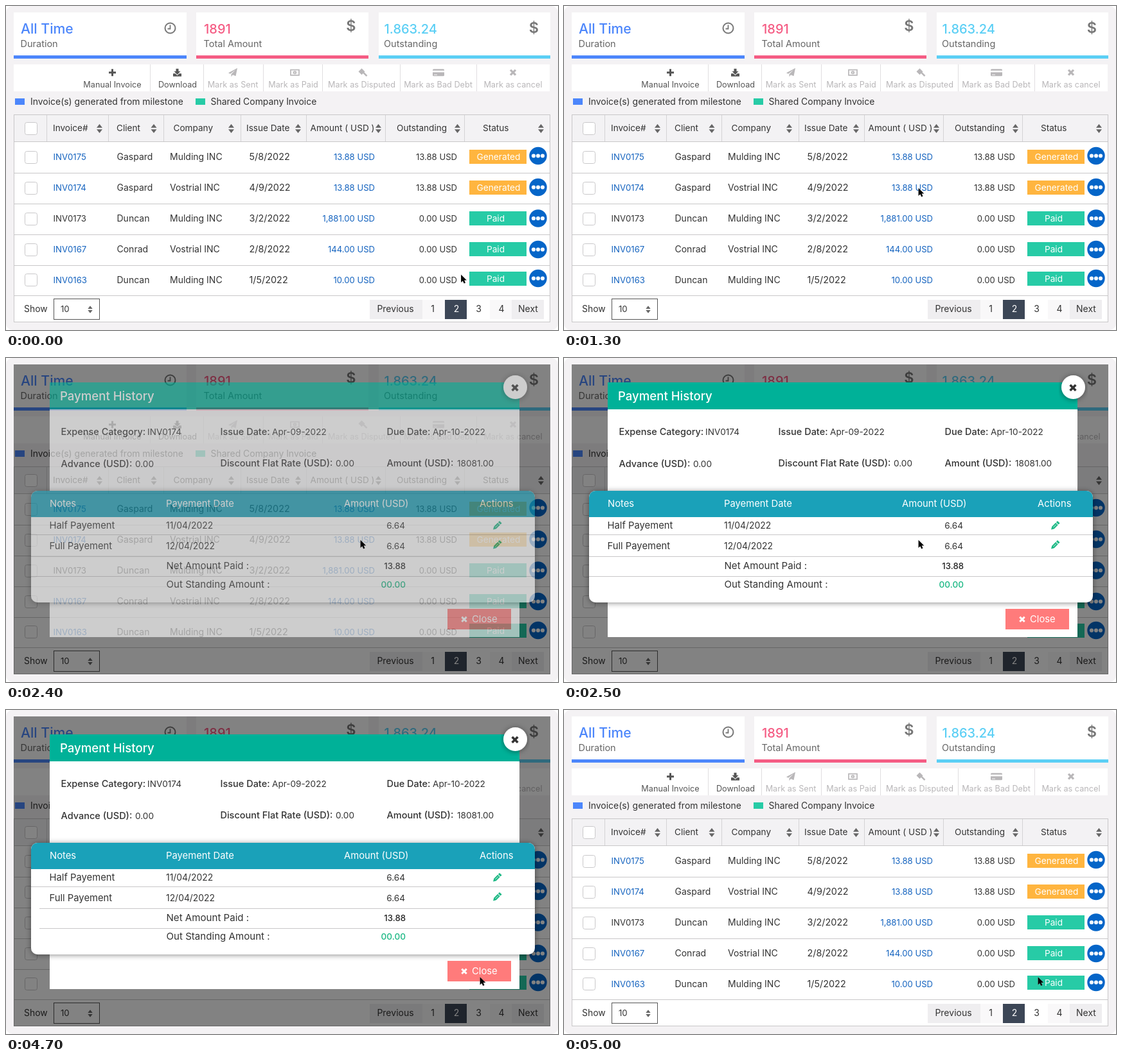
These frames come from a looping animation (859 px wide and 505 px high, 5.6 s). An HTML page:

```html
<!DOCTYPE html>
<html lang="en">
<head>
<meta charset="utf-8">
<title>Invoices</title>
<style>
html, body { margin: 0; width: 100%; height: 100%; overflow: hidden; background: #fff; }
svg { display: block; width: 859px; height: 505px; font-family: Inter, "Open Sans", sans-serif; }
</style>
</head>
<body>
<svg id="stage" viewBox="0 0 859 505" xmlns="http://www.w3.org/2000/svg">
  <defs>
    <filter id="shadow" x="-10%" y="-20%" width="120%" height="140%">
      <feDropShadow dx="0" dy="1" stdDeviation="4" flood-opacity=".45"/>
    </filter>
  </defs>
  <rect width="859" height="505" rx="10" fill="#f4f2f4"/>
  <g id="page"></g>
  <rect id="dim" x="12" y="10" width="835" height="483" fill="#000" fill-opacity=".49"/>
  <g id="modal"></g>
  <path id="cursor" d="M0 0V12.4L2.8 9.9 4.7 14 7.1 13 5.3 8.9H9Z" fill="#000" stroke="#fff" stroke-opacity=".35" stroke-width=".5"/>
</svg>
<script>
const $ = id => document.getElementById(id);
const INK = '#333', LINK = '#1463bf', MUTED = '#b9b7b9', ICON = '#555',
      TEAL = '#27cba6', AMBER = '#ffb53f', LINE = '#c8c7c8';

const rect = (x, y, w, h, fill, more = '') =>
  `<rect x="${x}" y="${y}" width="${w}" height="${h}" fill="${fill}" ${more}/>`;
const path = (d, fill, more = '') => `<path d="${d}" fill="${fill}" ${more}/>`;
const line = (d, color, width = 1, more = '') =>
  path(d, 'none', `stroke="${color}" stroke-width="${width}" ${more}`);
const circle = (x, y, r, fill, more = '') =>
  `<circle cx="${x}" cy="${y}" r="${r}" fill="${fill}" ${more}/>`;
const text = (x, y, s, size, fill = INK, anchor = 'start', weight = 400) =>
  `<text x="${x}" y="${y}" font-size="${size}" fill="${fill}" text-anchor="${anchor}" font-weight="${weight}">${s}</text>`;
const at = (x, y, body) => `<g transform="translate(${x} ${y})">${body}</g>`;

const cross = (x, y, r, color, width) =>
  at(x, y, line(`M${-r} ${-r}L${r} ${r}M${r} ${-r}L${-r} ${r}`, color, width));
const sorter = (x, y, k = 1) =>
  at(x, y, path(`M0 ${-7 * k}L${4.5 * k} ${-1.2 * k}H${-4.5 * k}ZM0 ${7 * k}L${4.5 * k} ${1.2 * k}H${-4.5 * k}Z`, '#666'));
const checkbox = y => rect(29.5, y - 9.5, 19, 19, '#fff', 'rx="3" stroke="#c9c8ca"');

function card(x, w, pad, title, label, color, size) {
  return rect(x, 10, w, 67, '#fff') + rect(x, 77, w, 5, color) +
    text(x + pad, 43, title, size, color, 'start', 500) +
    text(x + pad - .5, 64, label, 14.5, '#666');
}

function cards() {
  return card(12, 269, 11, 'All Time', 'Duration', '#4c86fb', 21.2) +
    card(296, 268, 12, '1891', 'Total Amount', '#f55c84', 20) +
    card(580, 267, 8.5, '1.863.24', 'Outstanding', '#5bcff5', 20) +
    circle(255.5, 34.5, 8, 'none', 'stroke="#777" stroke-width="2"') +
    line('M255.5 29.5V35.5H251.5', '#777', 1.8) +
    text(537, 39, '$', 23.5, '#777', 'middle', 600) +
    text(821.5, 42, '$', 23.5, '#777', 'middle', 600);
}

const icons = {
  plus: line('M0-5.5V5.5M-5.5 0H5.5', ICON, 3),
  load: path('M-2-6H2V-2H5L0 3.2-5-2H-2Z', ICON) + path('M-6.5 1.5H-3L0 4.5 3 1.5H6.5V6H-6.5Z', ICON),
  plane: path('M7-7L4.5 5.5 0 3.6-2.5 6.5V2.5L4.5-4.5-4 2-7 .5Z', MUTED),
  note: rect(-6.5, -4.2, 13, 8.4, 'none', `stroke="${MUTED}" stroke-width="1.7"`) +
    circle(0, 0, 2.6, MUTED) + line('M0-1.6V1.6', '#fff', .8),
  gavel: path('M-6.5-1.5L-1.5-6.5 3.5-1.5-1.5 3.5Z', MUTED) + line('M1 0L6.5 5.5', MUTED, 2.6),
  bank: rect(-9, -5.5, 18, 11, MUTED, 'rx="1.5"') + rect(-9, -3, 18, 2.6, '#fff') + line('M-7 3.5H-2', '#fff', .9),
  stop: line('M-4-4L4 4M4-4L-4 4', MUTED, 3.2)
};

function toolbar() {
  const items = [
    [165.5, 165.5, 'Manual Invoice', 'plus'], [267, 266.5, 'Download', 'load'],
    [353, 353, 'Mark as Sent', 'plane'], [447, 449.5, 'Mark as Paid', 'note'],
    [553.5, 555, 'Mark as Disputed', 'gavel'], [672.5, 673, 'Mark as Bad Debt', 'bank'],
    [789, 789, 'Mark as cancel', 'stop']
  ];
  return rect(12, 91, 834, 42, '#fff') +
    [224, 307, 400, 492, 613, 732].map(x => rect(x, 91, 1, 42, '#e0dee0')).join('') +
    items.map(([x, iconX, s, icon], i) =>
      at(iconX, 103.7, icons[icon]) +
      text(x, 127, s, 12.7, i < 2 ? '#555' : MUTED, 'middle')).join('');
}

function legend() {
  return rect(14, 144, 15, 10, '#4c86fb') + text(38, 154, 'Invoice(s) generated from milestone', 13.95) +
    rect(295, 144, 15, 10, TEAL) + text(318.5, 154, 'Shared Company Invoice', 13.95);
}

function row([no, client, firm, date, amount, due, paid], i) {
  const mid = 235 + 48 * i, base = mid + 5, last = i == 4;
  const top = last ? 414 : 224 + 48 * i;
  const dotY = [233.5, 282.5, 331, 379.5, 424.5][i];
  return checkbox(last ? 427 : mid + 1) +
    text(73.5, base, no, 13.2, i == 2 ? INK : LINK) +
    text(172.5, base, client, 14) + text(255, base, firm, 14) + text(378.5, base, date, 14.4) +
    text(574, base, amount + ' USD', 13.1, LINK, 'end') +
    text(702, base, due + ' USD', 13.1, INK, 'end') +
    rect(721, top, 89, 22, paid ? TEAL : AMBER) +
    text(paid ? 762 : 766.5, top + 15.5, paid ? 'Paid' : 'Generated', 13.7, '#fff', 'middle') +
    circle(828, dotY, 13.7, '#0465c8') +
    [-7, 0, 7].map(d => circle(828 + d, dotY, 3.1, '#fff')).join('');
}

function table() {
  const heads = [[73, 'Invoice#'], [172, 'Client'], [260.5, 'Company'], [374, 'Issue Date'],
    [473.5, 'Amount ( USD )'], [608, 'Outstanding'], [742, 'Status']];
  const rows = [
    ['INV0175', 'Gaspard', 'Mulding INC', '5/8/2022', '13.88', '13.88', 0],
    ['INV0174', 'Gaspard', 'Vostrial INC', '4/9/2022', '13.88', '13.88', 0],
    ['INV0173', 'Duncan', 'Mulding INC', '3/2/2022', '1,881.00', '0.00', 1],
    ['INV0167', 'Conrad', 'Vostrial INC', '2/8/2022', '144.00', '0.00', 1],
    ['INV0163', 'Duncan', 'Mulding INC', '1/5/2022', '10.00', '0.00', 1]
  ];
  return rect(12.5, 169.5, 834, 323, '#fff') + rect(13, 170, 833, 41, '#f3f2f4') +
    [63, 159, 245, 365, 467, 590, 713].map(x => rect(x, 170, 1, 41, '#d4d3d5')).join('') +
    [211, 260, 308, 356, 404, 451].map(y => rect(13, y, 833, 1, LINE)).join('') +
    rect(12.5, 169.5, 834, 323, 'none', `stroke="${LINE}"`) +
    checkbox(191) +
    heads.map(([x, s]) => text(x, 194.7, s, 13.6)).join('') +
    [145.5, 230, 350.5, 454.5, 579.5, 702.5, 832.5].map(x => sorter(x, 191)).join('') +
    rows.map(row).join('');
}

function footer() {
  const pages = [
    [566, 82, 606, 'Previous', '#efeef0'], [648, 35, 664, '1', '#f9f8f9'], [683, 34, 701, '2', '#3c4656'],
    [717, 36, 735.5, '3', '#fff'], [753, 34, 771, '4', '#f9f8f9'], [787, 50, 812.5, 'Next', '#efeef0']
  ];
  return text(28, 477, 'Show', 13.9) +
    rect(74.5, 456.5, 71, 32, '#fff', 'stroke="#555"') + text(85, 477, '10', 13.2) + sorter(131, 473, .82) +
    pages.map(([x, w, mid, s, fill]) => rect(x, 458, w, 30, fill) +
      text(mid, 477, s, 14, s == '2' ? '#fff' : INK, 'middle')).join('');
}

const pencil = y => at(764, y, `<g transform="rotate(45)">` +
  path('M-2.5-4.2H2.5V4.2L0 8.4-2.5 4.2ZM-2.5-8.2H2.5V-5.2H-2.5Z', '#1bb884') +
  line('M0-3V3.6', '#fff', .8) + '</g>');

function modal() {
  const fields = [
    [85.5, 220, 120, 'Expense Category:', 'INV0174'], [333.5, 414, 120, 'Issue Date:', 'Apr-09-2022'],
    [592.5, 664, 120, 'Due Date:', 'Apr-10-2022'], [85.5, 201, 170, 'Advance (USD):', '0.00'],
    [333.5, 513, 169, 'Discount Flat Rate (USD):', '0.00'], [592.5, 702, 169, 'Amount (USD):', '18081.00']
  ];
  const panel = rect(39, 207, 784, 174, '#fff', 'rx="10" filter="url(#shadow)"') +
    path('M39 248V217A10 10 0 0 1 49 207H813A10 10 0 0 1 823 217V248Z', '#1aa1b9') +
    [[68, 'Notes'], [249, 'Payement Date'], [526, 'Amount (USD)'], [737, 'Actions']]
      .map(([x, s]) => text(x, 232, s, 14.8, '#fff')).join('') +
    rect(39, 275, 784, 1, LINE) +
    '<path id="rules" stroke="#c8c7c8"/>' +
    [['Half Payement', '11/04/2022', 266], ['Full Payement', '12/04/2022', 297.5]].map(([s, date, y]) =>
      text(67.5, y, s, 14.8) + text(249, y, date, 13.9) + text(621, y, '6.64', 13.6, INK, 'end')).join('') +
    pencil(261.5) + pencil(291.5) +
    text(249.5, 329, 'Net Amount Paid :', 15.1) + text(622, 329, '13.88', 13.2, '#222', 'end', 500) +
    text(249.5, 358, 'Out Standing Amount :', 15.1) + text(622, 358, '00.00', 13.6, '#1bb884', 'end', 500);
  return rect(68, 38, 731, 397, '#fff') + rect(68, 38, 731, 42, '#00b198') +
    text(84, 65.5, 'Payment History', 18.6, '#fff', 'start', 500) +
    fields.map(([x, vx, y, label, value]) =>
      text(x, y, label, 14.5, INK, 'start', 500) + text(vx, y, value, 13.6)).join('') +
    rect(687, 391, 99, 32, '#ff7b7b') + cross(713, 407.3, 3.7, '#fff', 3) + text(725, 412, 'Close', 14.8, '#fff') +
    panel +
    circle(792.5, 45.5, 18.5, '#fff', 'filter="url(#shadow)"') + cross(792, 46.3, 4.4, '#333', 3.6);
}

$('page').innerHTML = cards() + toolbar() + legend() + table() + footer();
$('modal').innerHTML = modal();

const LOOP = 5600, TICK = 100;
const home = [708, 418.5], cell = [551.5, 283.5], exit = [737.5, 416];

// Progress of a move made of n ticks; the first tick already shows motion.
function steps(t, start, n) {
  const k = Math.floor((t - start) / TICK) + 1;
  return Math.min(1, Math.max(0, k / n));
}
const ease = p => 1 - Math.pow(1 - p, 1.3);
const mix = (a, b, p) => a.map((v, i) => v + (b[i] - v) * p);

function draw(t) {
  const away = ease(steps(t, 4500, 3));
  const pos = away ? mix(cell, exit, away) : mix(home, cell, ease(steps(t, 1000, 4)));
  $('cursor').setAttribute('transform', `translate(${pos.map(v => v.toFixed(2))})`);
  $('dim').style.display = t >= 2300 && t < 5000 ? '' : 'none';
  $('modal').style.display = t >= 2400 && t < 4900 ? '' : 'none';
  $('modal').setAttribute('opacity', t < 2500 ? .6 : 1);
  const left = t < 4500 ? 39 : 52;
  $('rules').setAttribute('d', `M${left} 309.5H823M${left} 340.5H823`);
}

function tick() {
  draw(performance.now() % LOOP);
  requestAnimationFrame(tick);
}
tick();
</script>
</body>
</html>
```
